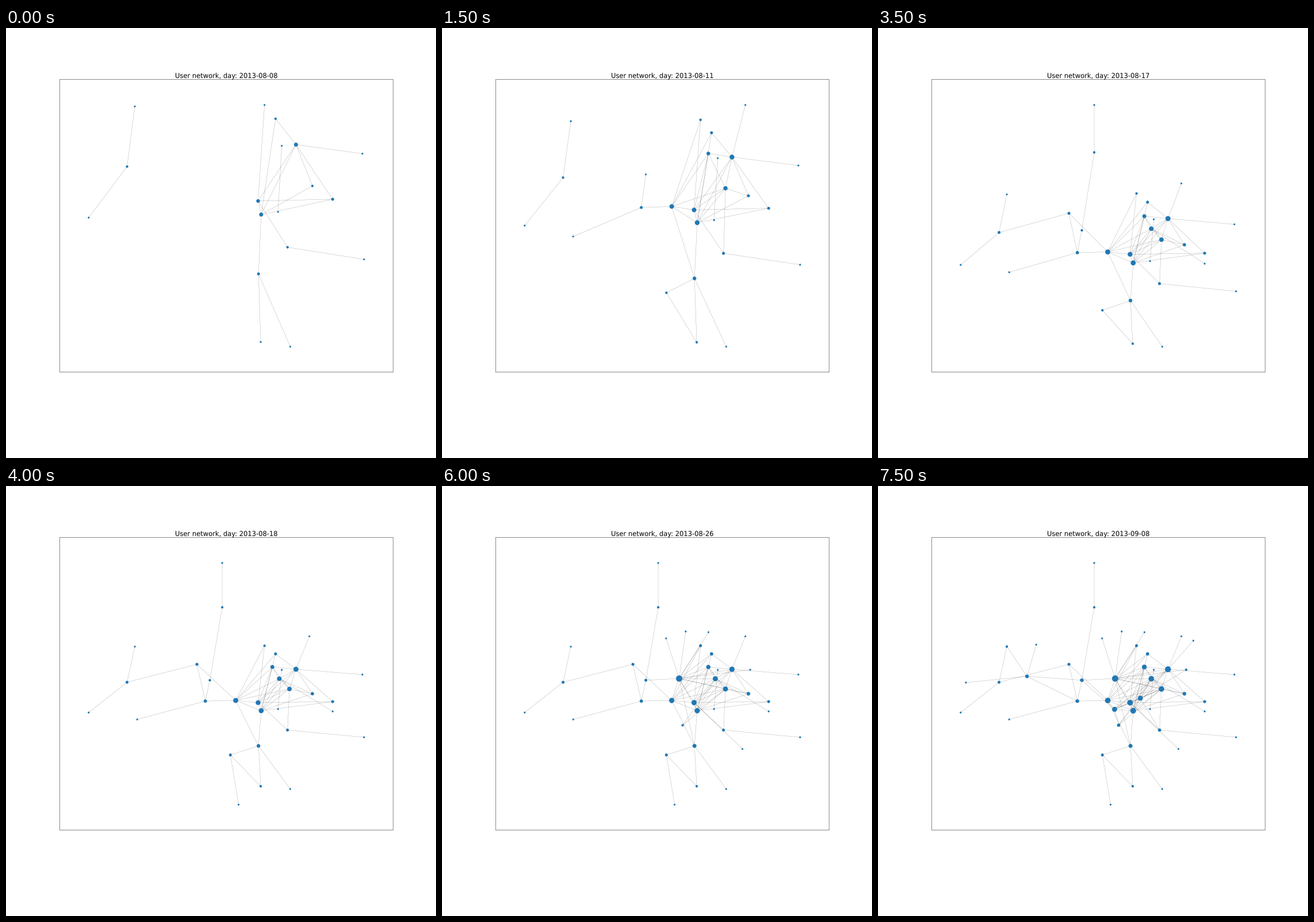
A matplotlib script for the animation above (8000 ms loop, 748 px wide and 748 px high).

```python
import matplotlib.pyplot as plt
import numpy as np
from matplotlib.animation import FuncAnimation
from matplotlib.collections import LineCollection

SIZE, DPI = 748, 68
PT = SIZE / 18 / DPI  # layout is designed for an 18-inch sheet
TOP, BOTTOM = 133.9, 554.3

POS = {
    "A": (504.4, 318.7), "B": (438.5, 376.8), "C": (443.9, 390.8),
    "D": (468.9, 292), "E": (449.7, 277.8), "F": (533, 361.3),
    "G": (568.2, 375), "H": (489.7, 424.5), "I": (439.2, 452),
    "J": (443.1, 522.2), "K": (494.4, 527), "L": (622.9, 437),
    "M": (619.9, 328), "N": (479.7, 319.9), "O": (473.2, 388),
    "P": (224.1, 279.3), "Q": (210.6, 341.3), "R": (143.8, 394),
    "S": (527.7, 261.5), "T": (463.3, 314.8), "U": (493.1, 353),
    "V": (399.6, 373), "W": (354.6, 337.8), "X": (346.7, 374.1),
    "Y": (228.2, 406), "Z": (390.3, 467.8),
    "a": (332.1, 310.1), "b": (475.4, 335.2), "c": (568.2, 392),
    "d": (376.1, 133.9), "e": (376.1, 211),
    "f": (412.5, 334.9), "g": (389.8, 265), "h": (423.9, 253),
    "i": (463.5, 254.3), "j": (536.1, 319.6), "k": (404.6, 554.2),
    "l": (411.5, 388.4), "m": (418.6, 416.1), "n": (522.6, 457.4),
    "o": (456.2, 369), "p": (548.6, 269), "q": (259.2, 331.1),
    "r": (275.3, 276), "s": (152.9, 341.9),
}

# Each day: date and the links that appear on it
DAYS = [
    ("08-08", "PQ QR EB DA DC AM AF AG AB AC NO BG BC CF CG CI BH HL IJ IK"),
    ("08-09", "XY XW XV VE VD VT VC VB VI ZI ZJ TA TB TC"),
    ("08-10", "UV UT UA UF UB UC UH"),
    ("08-11", "AS"),
    ("08-12", ""),
    ("08-15", "aQ aX aV"),
    ("08-16", "bV bT bA bF bB bC bU bc"),
    ("08-17", "de eW"),
    ("08-18", "Zk"),
    ("08-21", ""),
    ("08-22", "fW fg fh fi fE fD fT fA fj fb fU fF fB fC fV fI"),
    ("08-23", "mU mb"),
    ("08-26", "nB"),
    ("08-29", "lW lV lm lC lB lA lb lT lU"),
    ("09-03", "qX qW qP qr qs"),
    ("09-08", "ol oH oA ob oU oT oC oj oB om pA"),
]

plt.rcParams["text.hinting"] = "none"
fig = plt.figure(figsize=(SIZE / DPI, SIZE / DPI), dpi=DPI, facecolor="white")
ax = fig.add_axes([0.125, 0.2, 0.775, 0.68])
ax.set_xlim(0.125 * SIZE, 0.9 * SIZE)
ax.set_ylim(0.8 * SIZE, 0.12 * SIZE)
ax.set_xticks([])
ax.set_yticks([])
for spine in ax.spines.values():
    spine.set_linewidth(0.8 * PT)
    spine.set_snap(False)

title = ax.set_title("", fontsize=20 * PT, pad=6 * PT, family="DejaVu Sans")
links = LineCollection([], colors="black", linewidths=0.5 * PT, alpha=0.5,
                       zorder=1)
ax.add_collection(links, autolim=False)
dots = ax.scatter([], [], color="#1f77b4", linewidths=PT, zorder=2)


def draw(step):
    edges = " ".join(new for _, new in DAYS[:step + 1]).split()
    ends = "".join(edges)
    names = sorted(set(ends))
    xy = np.array([POS[n] for n in names])

    # The visible graph always fills the full height
    y = xy[:, 1]
    xy[:, 1] = TOP + (y - y.min()) / (y.max() - y.min()) * (BOTTOM - TOP)

    place = dict(zip(names, xy))
    links.set_segments([[place[u], place[v]] for u, v in edges])
    dots.set_offsets(xy)
    dots.set_sizes([20 * ends.count(n) * PT ** 2 for n in names])
    title.set_text(f"User network, day: 2013-{DAYS[step][0]}")
    return links, dots, title


anim = FuncAnimation(fig, draw, frames=len(DAYS), interval=500,
                     repeat=True, repeat_delay=0, blit=False)
plt.show()
```
